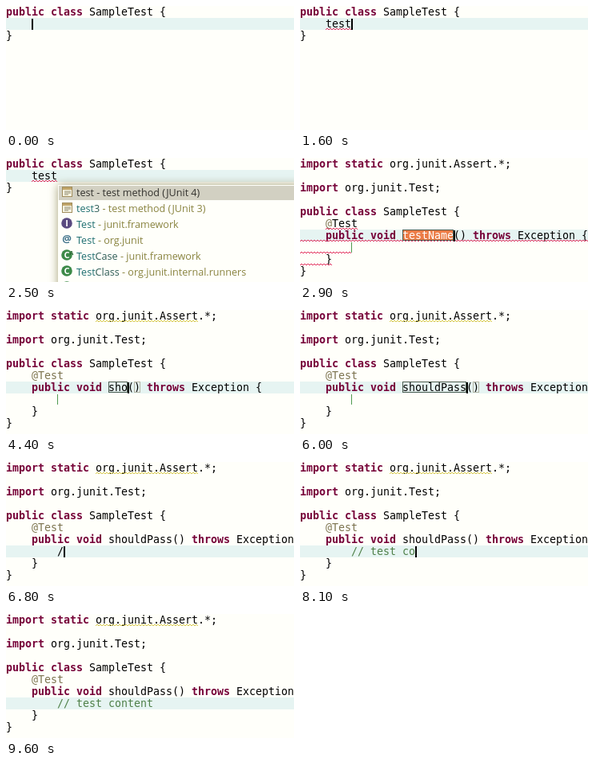
Animation, 360 px wide and 156 px high, one loop 9.8 s. Source, as an HTML page:

```html
<!DOCTYPE html>
<html lang="en">
<head>
<meta charset="utf-8">
<title>Unit test template</title>
<style>
html, body { margin: 0; width: 100%; height: 100%; overflow: hidden; background: #fffffa; }
svg { display: block; }
text { white-space: pre; }
.code { font: 13.29px "DejaVu Sans Mono", monospace; }
.menu { font: 12.6px "Open Sans", sans-serif; }
.panel { filter: drop-shadow(0 0 6px rgba(100, 92, 30, .6)); }
.key { font-weight: bold; fill: #760038; }
.note { fill: #7d7450; }
.comment { fill: #4f8048; }
.picked { fill: #fff; }
</style>
</head>
<body>
<svg id="stage" width="360" height="156" viewBox="0 0 360 156">
  <g id="editor" class="code"></g>
  <g id="popup" class="menu"></g>
</svg>
<script>
const LOOP = 9800, CELL = 8, ROW = 15;
const editor = document.getElementById('editor');
const popup = document.getElementById('popup');

// Step tables: [time, value], each value holds until the next time.
const WORD = [[0, ''], [600, 't'], [800, 'te'], [900, 'tes'], [1100, 'test']];
const NAME = [[0, 'testName'], [3400, 's'], [3600, 'sh'], [3900, 'sho'], [4600, 'shou'],
  [4800, 'shoul'], [5200, 'should'], [5400, 'shouldP'], [5600, 'shouldPa'],
  [5800, 'shouldPas'], [5900, 'shouldPass']];
const COMMENT = '// test content';
const COMMENT_LENGTH = [[0, 0], [6800, 1], [6900, 2], [7100, 3], [7400, 4], [7500, 5], [7600, 6],
  [7700, 7], [7800, 8], [7900, 9], [8000, 10], [8200, 11], [8300, 12], [8400, 13], [8500, 14], [8600, 15]];
const CARET = [[0, 1], [2400, 0], [2800, 1], [9000, 0], [9300, 1], [9600, 0]];
const POPUP = [[0, 0], [1700, 0.4], [1800, 0.8], [1900, 1], [2800, 0]];

const at = (table, t) => table.reduce((v, step) => t >= step[0] ? step[1] : v, table[0][1]);

const rect = (x, y, w, h, fill, stroke = 'none') =>
  `<rect x="${x}" y="${y}" width="${w}" height="${h}" fill="${fill}" stroke="${stroke}"/>`;
const frame = (col, count, row, color) =>
  rect(col * CELL + 0.5, row * ROW + 0.5, count * CELL - 1, ROW - 2, 'none', color);
const currentLine = row => rect(0, row * ROW, 360, ROW, '#e6f4f2');
const caret = (col, row) => rect(col * CELL, row * ROW + 1, 2, 14, '#000');

// Each run is [text, class]; runs follow one another on the character grid.
function line(row, col, ...runs) {
  return runs.map(([s, cls = '']) => {
    const out = `<text x="${col * CELL}" y="${row * ROW + 12}" class="${cls}">${s}</text>`;
    col += s.length;
    return out;
  }).join('');
}

function squiggle(x1, x2, y, color) {
  let d = `M${x1} ${y}`;
  for (let x = x1 + 2, up = true; x <= x2; x += 2, up = !up) d += `L${x} ${up ? y - 2 : y}`;
  return `<path d="${d}" fill="none" stroke="${color}"/>`;
}
const errorLine = (x1, x2, row) => squiggle(x1, x2, row * ROW + 15, '#e2305c');

const classLine = row => line(row, 0, ['public class', 'key'], [' SampleTest {']);

function firstDraft(t) {
  const word = at(WORD, t);
  return currentLine(1) + classLine(0) + line(1, 4, [word]) + line(2, 0, ['}']) +
    (t >= 1600 ? errorLine(32, 64, 1) : '') +
    (at(CARET, t) ? caret(4 + word.length, 1) : '');
}

function expanded(t) {
  const name = at(NAME, t), end = 16 + name.length;
  const count = at(COMMENT_LENGTH, t);
  const inBody = t >= 6200, selected = t < 3400, parsed = t >= 3300;
  let s = currentLine(inBody ? 7 : 6);
  if (selected) s += rect(16 * CELL, 6 * ROW, 64, 14, '#ec7c46');
  s += line(0, 0, ['import static', 'key'], [' org.junit.Assert.*;']);
  s += line(2, 0, ['import', 'key'], [' org.junit.Test;']);
  s += classLine(4);
  s += line(5, 4, ['@', 'note'], ['Test', parsed ? 'note' : '']);
  s += line(6, 4, ['public void ', 'key'], [name, selected ? 'picked' : ''], ['() '],
    ['throws', 'key'], [' Exception {']);
  s += line(7, 8, [COMMENT.slice(0, count), count > 1 ? 'comment' : '']);
  s += line(8, 4, ['}']) + line(9, 0, ['}']);
  if (t >= 4400) s += squiggle(112, 240, 15, '#d6c848');
  if (!parsed) {
    s += errorLine(32, 72, 5) + errorLine(0, 360, 6) + errorLine(0, 64, 7) + errorLine(0, 40, 8);
  }
  if (!inBody) {
    s += frame(16, name.length, 6, '#4c5c50') + rect(64, 106, 1, 13, '#4f9a4f');
    if (!selected) s += frame(end + 1, 1, 6, '#b4b4a4');
  }
  if (at(CARET, t)) s += inBody ? caret(8 + count, 7) : caret(end, 6);
  return s;
}

const glyph = (x, y, size, fill, letter) =>
  `<text x="${x}" y="${y}" text-anchor="middle" font-size="${size}" font-weight="bold" fill="${fill}">${letter}</text>`;
const badge = (y, letter, color) =>
  `<circle cx="76" cy="${y - 1}" r="6.8" fill="${color}"/>` + glyph(76, y + 3, 11, '#fff', letter);
const greenBadge = y => badge(y, 'C', '#3d8a48');

function page(y) {
  let s = rect(70.5, y - 6.5, 12, 12, '#fbf8e4', '#a08c5c') + rect(71, y - 6, 11, 3, '#c0a468');
  for (let i = 0; i < 3; i++) s += rect(73, y - 1.5 + i * 2, i === 2 ? 5 : 8, 1, '#8e8a70');
  return s;
}

function drawPopup() {
  const items = [
    ['test', '', ' - test method (JUnit 4)', page],
    ['test', '3', ' - test method (JUnit 3)', page],
    ['Test', '', ' - junit.framework', y => badge(y, 'I', '#5a4a80')],
    ['Test', '', ' - org.junit', y => glyph(76, y + 3, 13, '#3c7088', '@')],
    ['Test', 'Case', ' - junit.framework', y => greenBadge(y) + glyph(82, y - 1, 7, '#2d6a35', 'A')],
    ['Test', 'Class', ' - org.junit.internal.runners', greenBadge],
    ['', '', '', greenBadge]
  ];
  let s = `<g class="panel">${rect(65, 34, 320, 140, '#fffffa')}</g>` + rect(66, 35, 294, 18, '#d2d0c2');
  items.forEach(([match, rest, origin, icon], i) => {
    const y = 43 + i * 20;
    const [c1, c2, c3] = i ? ['#1f6f70', '#2e5c55', '#8a8440'] : ['#33322e', '#33322e', '#33322e'];
    s += icon(y) + `<text x="88" y="${y + 4.5}" fill="${c1}">${match}` +
      `<tspan fill="${c2}">${rest}</tspan><tspan fill="${c3}">${origin}</tspan></text>`;
  });
  popup.innerHTML = s;
}

let shown = '';
function draw(now) {
  const t = Math.floor((now % LOOP) / 100) * 100;
  const picture = t < 2800 ? firstDraft(t) : expanded(t);
  if (picture !== shown) editor.innerHTML = shown = picture;
  popup.setAttribute('opacity', at(POPUP, t));
  requestAnimationFrame(() => draw(performance.now() - start));
}

drawPopup();
const start = performance.now();
draw(0);
</script>
</body>
</html>
```
